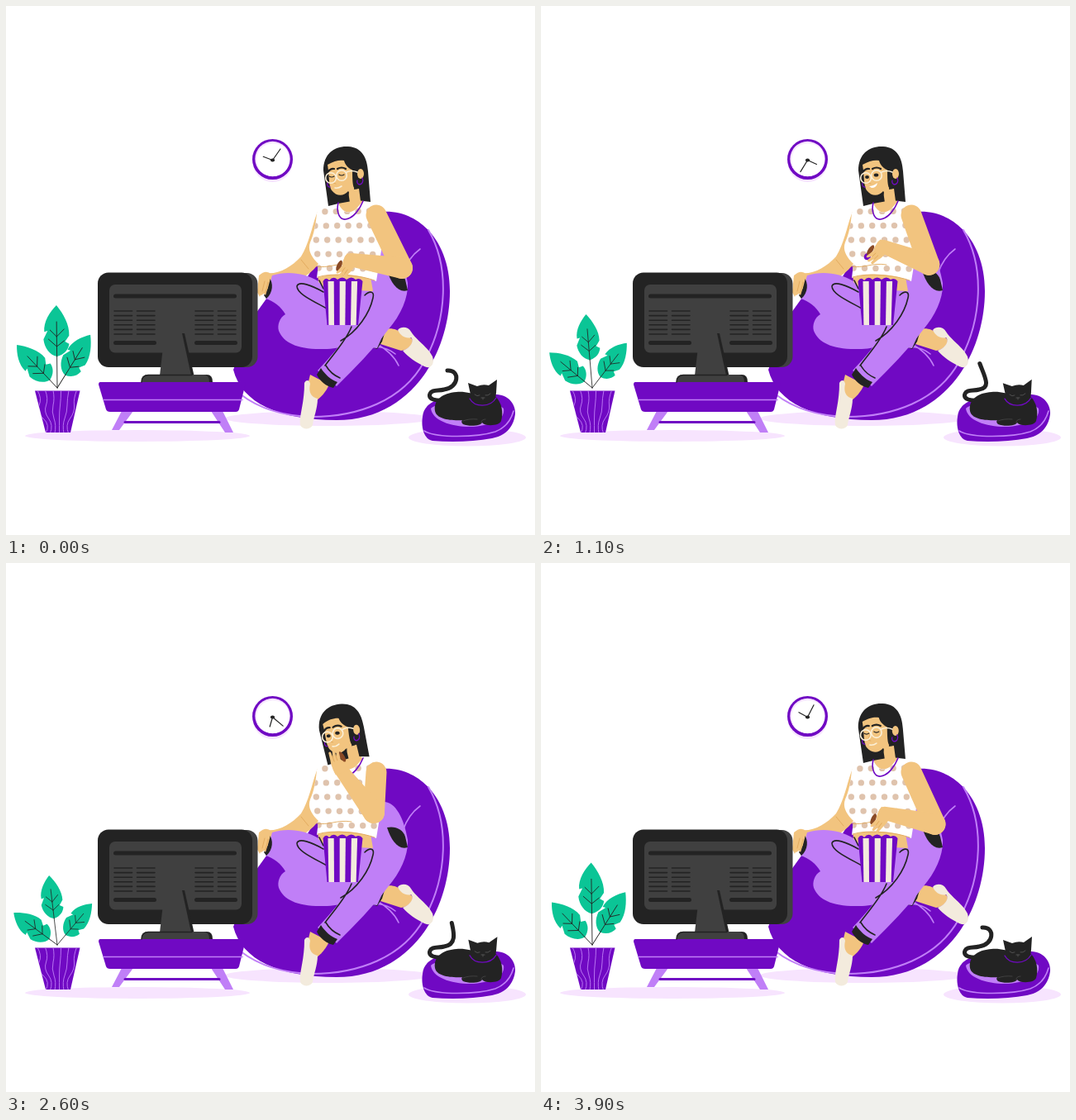
An HTML page that plays this animation: 640x640 px, repeating every 4000 ms.

```html
<!DOCTYPE html>
<html lang="en">
<head>
<meta charset="utf-8">
<title>Movie night</title>
<style>
html, body { margin: 0; width: 100%; height: 100%; overflow: hidden; background: #fff; }
svg { display: block; width: 100vw; height: 100vh; }
.p { fill: #7009c3; } .l { fill: #c07ff7; } .k { fill: #232323; } .g { fill: #404040; }
.s { fill: #f2c47f; } .w { fill: #fff; } .c { fill: #f3ebdd; } .sh { fill: #f7e4fe; }
.ln { fill: none; stroke-linecap: round; stroke-linejoin: round; stroke-width: 1.6; }
.lp { stroke: #c07ff7; } .lk { stroke: #232323; } .lv { stroke: #7009c3; }
.lc { stroke: #fbf0d8; } .lb { stroke: #e0a95c; } .thin { stroke-width: .9; }
</style>
</head>
<body>
<svg viewBox="0 0 640 640">
  <defs>
    <path id="leaf" d="M0-62C-8-54-16-42-15-30L-11-31L-16-21C-15-11-9-2 0 0C9-2 14-8 15-15L10-18L15-25C16-38 8-52 0-62Z"/>
    <path id="veins" d="M0-42V0M0-24l-8-8M0-24l9-9M0-12l-10-9M0-12l9-7"/>
    <clipPath id="shirtClip"><use href="#shirt"/></clipPath>
    <clipPath id="potClip"><use href="#pot"/></clipPath>
    <clipPath id="boxClip"><use href="#box"/></clipPath>
  </defs>

  <g class="sh">
    <ellipse cx="159" cy="520" rx="136" ry="7"/>
    <ellipse cx="390" cy="499" rx="125" ry="9"/>
    <ellipse cx="558" cy="522" rx="71" ry="10.500"/>
  </g>

  <!-- clock -->
  <circle class="sh" cx="322.500" cy="189" r="24"/>
  <circle class="p" cx="322.500" cy="185.500" r="24.500"/>
  <circle class="sh" cx="322.500" cy="185" r="21.200"/>
  <circle class="w" cx="323" cy="186" r="20"/>
  <g class="ln lk" style="stroke-width:1.200">
    <path id="minute" d="M322.500 186.500V170"/>
    <path id="hour" d="M322.500 186.500V174.500"/>
  </g>
  <ellipse class="k" cx="322.500" cy="186.500" rx="2.600" ry="2"/>

  <!-- bean bag -->
  <path class="p" d="M455 249C500 246 537 285 537 345C537 420 490 501 400 501C330 501 285 480 275 440L300 375L318 350L360 335L372 316L450 290Z"/>
  <g class="ln lp">
    <path style="stroke-width:2" d="M511 271C537 315 534 380 506 430C480 478 425 497 370 497C335 496 305 486 284 470"/>
    <path d="M501 294C490 302 484 312 480 324M447 408C460 415 470 424 475 435M448 412C456 413 465 416 471 421"/>
  </g>

  <!-- far foot -->
  <path class="s" d="M458 391C466 389 474 391 478 396C485 400 491 400 492 405C491 412 485 416 478 417L453 409Z"/>
  <path class="c" d="M474 392C478 387 487 388 490 394C497 405 510 412 516 424C519 433 514 440 506 436C496 431 487 425 480 417C490 413 494 405 490 401C484 403 477 399 474 392Z"/>
  <path class="k" d="M452 398L460 389L455 406L449 415L443 413Z"/>

  <!-- far arm -->
  <path class="s" d="M377 249C371 262 368 285 357 303C345 316 330 325 314 323C308 330 305 338 304 347L309 350L316 345L322 338C340 337 360 331 372 319L379 311L386 260Z"/>

  <!-- legs -->
  <g class="l">
    <path d="M378 333C362 323 340 320 322 326L314 354C324 357 333 364 338 373C331 377 328 386 330 393C336 408 354 416 385 415C405 415 425 408 435 398L450 350L440 330Z"/>
    <path d="M425 395L462 385L449 414L430 412Z"/>
    <path d="M440 332L452 290C468 284 481 305 486 335C487 352 478 374 462 392C445 415 420 440 400 460L377 441C392 425 405 410 415 395L432 360Z"/>
  </g>
  <path class="k" d="M461 320C471 318 480 322 483 331L486 344C475 348 466 336 461 320Z"/>
  <path class="k" d="M318 328C324 335 323 347 315 354L312 350L317 341Z"/>
  <path class="s" d="M306 326Q315 318 321 325L318 337L314 350L310 345L307 352L304 346Z"/>
  <path class="ln lb thin" d="M310 345L313 333M314 347L317 334"/>
  <path class="ln lk" d="M388 366C370 356 352 348 352 339C354 332 370 338 384 346M434 350C440 344 446 345 444 353C440 372 425 394 405 405M418 388C412 404 397 420 386 435"/>
  <path class="s" d="M368 446L391 458C387 467 381 474 372 480L362 470Z"/>
  <path class="k" d="M381 438C386 446 393 452 401 455L396 462C387 460 380 454 376 446Z"/>
  <path class="ln lk" d="M387 435C391 442 397 447 404 450"/>
  <path class="c" d="M361 456C363 452 367 452 368 457C366 466 368 473 377 475C377 487 372 498 371 507C368 513 359 513 356 507C354 497 361 482 361 456Z"/>

  <!-- torso -->
  <path class="s" d="M377 322H440L444 345L388 342L378 334Z"/>
  <path class="lk ln" d="M379 332L384 342"/>
  <path class="s" d="M411 218L428 210L430 235L434 240C425 253 408 255 402 238L412 231Z"/>
  <path id="shirt" class="w" d="M376 250C385 241 395 240 402 238C404 250 416 253 424 245L432 236L445 241L458 260L455 290L448 333C430 325 395 321 376 329L378 312C368 302 365 294 368 286C373 275 375 262 376 250Z"/>
  <g id="dots" clip-path="url(#shirtClip)" fill="#dfc3ad"></g>
  <path class="ln lb thin" d="M376 315C390 318 400 310 418 313M357 307L366 318M377 328C395 322 430 326 446 332"/>

  <!-- head -->
  <g id="head">
    <path class="k" d="M384 199C384 178 398 169 414 170C431 171 437 184 438 200L441 237L424 235L413 237L402 239L390 242Z"/>
    <path class="s" d="M390 199L389 192C397 187 404 186 409 187C410 192 415 197 420 199L423 205L421 222L427 221L429 236L416 238L414 224C409 230 400 231 394 223C391 219 391 210 390 199Z"/>
    <path class="k" d="M403 231C408 231 412 228 415 224C415 231 411 235 405 235ZM419 198L425 200L425 221C420 223 419 217 419 198Z"/>
    <ellipse class="s" cx="429" cy="203" rx="4" ry="6"/>
    <path class="ln lv" style="stroke-width:1.300" d="M431 208C433 212 431 216 427 216Q424 214 425 211M389 214Q388 219 392 219"/>
    <path class="ln lk" style="stroke-width:2.200" d="M390 200Q393 196 397 197M401 197Q406 194 411 197"/>
    <path class="ln lb thin" d="M399 205L396 214L399 215"/>
    <g id="open" class="k"><ellipse cx="394.500" cy="207" rx="2.500" ry="2"/><ellipse cx="405.500" cy="204.500" rx="2.800" ry="2"/></g>
    <path id="shut" class="ln lk" style="stroke-width:1.200" d="M391 206Q394 208 397 206M403 204Q406 206 409 204"/>
    <g class="ln lc"><circle cx="393" cy="208" r="6.300"/><circle cx="406" cy="205" r="6.300"/><path d="M412 201Q418 198 425 201"/></g>
    <path id="smile" class="w" d="M397 218Q402 218 407 214Q406 220 400 220Z"/>
    <path id="lips" class="ln lc" d="M398 220Q402 221 406 218"/>
  </g>
  <path class="ln lv" d="M402 238C399 250 404 259 411 258C420 257 428 246 432 236"/>

  <!-- near arm -->
  <path id="upper" class="s"/>
  <path id="fore" class="s"/>
  <g id="hand">
    <ellipse id="snack" class="p" cx="22" cy="4" rx="4.500" ry="4"/>
    <ellipse cx="14" cy="7" rx="7" ry="2.800" fill="#8a4a26" transform="rotate(-12 14 7)"/>
    <path class="s" d="M-4-8C4-9 11-9 15-8L24-7Q26-4 22-4L17-4L25-2Q27 1 23 1L17 0L23 3Q24 6 20 5L12 4C8 7 2 8-4 8Z"/>
    <path class="ln lb thin" d="M12-4H19M12 0H18"/>
  </g>

  <!-- popcorn box -->
  <path id="box" class="p" d="M383.500 333Q387 327 391 332Q396 326 401 331Q407 326 412 331Q418 326 423 331Q428 328 431.500 333L426 386H388.500Z"/>
  <g id="stripes" class="c" clip-path="url(#boxClip)"></g>

  <!-- television -->
  <path class="l" d="M140 490H154L137 513H128ZM248 490H262L275 516H265Z"/>
  <path class="ln lv" style="stroke-width:3" d="M144 503.500H258"/>
  <path class="p" d="M114 455H288Q290 455 289.500 458L282 488Q281 491 278 491H126Q122 491 121 488L112 458Q112 455 114 455Z"/>
  <path class="ln lp" d="M118 476.500H286"/>
  <rect class="g" x="140" y="323" width="164.500" height="114" rx="13"/>
  <rect class="k" x="111" y="322.500" width="187" height="114.500" rx="13"/>
  <rect class="g" x="125" y="337" width="160" height="82.500" rx="7"/>
  <g class="k">
    <rect x="130" y="348.500" width="149" height="5" rx="2.500"/>
    <rect x="130" y="405" width="52" height="5" rx="2.500"/>
    <rect x="228" y="405" width="52" height="5" rx="2.500"/>
    <path d="M200 446H243Q250 446 250 455H200Z"/>
    <path d="M206 396H216L227.500 447H215Z"/>
  </g>
  <g id="vents" class="ln lk"></g>
  <path class="g" d="M164 455Q164 446 172 446H239Q246 446 246 455Z"/>
  <path class="g" d="M192 396H213L224 447H186Z"/>
  <path class="ln lk" d="M164 455Q164 447 172 446.500H225"/>

  <!-- plant -->
  <g id="plant"></g>
  <path id="pot" class="p" d="M35 465.500H89.500L78 516H48Z"/>
  <g id="grain" class="ln lp thin" clip-path="url(#potClip)"></g>

  <!-- cat -->
  <path class="p" d="M504 497C505 482 520 473 548 472L592 470C608 470 617 482 616 494C614 510 604 520 588 523C566 527 540 528 516 526C505 524 502 508 504 497Z"/>
  <path class="l" d="M514 487C520 478 590 474 602 487C604 500 590 506 566 509C540 510 516 502 514 487Z"/>
  <path class="ln lp" d="M506 514C520 523 570 522 592 515C605 510 611 501 614 490"/>
  <path id="tail" class="ln lk" style="stroke-width:5"/>
  <path class="k" d="M519 490C517 477 528 468 545 467C555 466 565 469 572 472L592 472C600 480 602 492 599 502C597 508 580 509 576 504C575 508 560 509 553 506C550 503 551 501 554 501C538 502 521 500 519 490Z"/>
  <path class="ln thin" stroke="#454545" d="M575 504Q575 500 580 500M553 502Q560 499 570 500"/>
  <g id="cat">
    <path class="k" d="M559 456L570 460Q577 457 584 459L594 452L593 468C593 486 563 486 562 470Z"/>
    <path class="ln lv" style="stroke-width:1.300" d="M561 475C567 486 586 486 593 474"/>
    <path class="ln thin" stroke="#555" d="M567 470Q570 473 573 471M580 471Q583 472 586 469M575 474H579M577 474V476"/>
  </g>
</svg>
<script>
const $ = id => document.getElementById(id);
const show = (id, on) => $(id).style.display = on ? '' : 'none';
const move = (el, value) => el.setAttribute('transform', value);
const mix = (a, b, k) => a + (b - a) * k;
const ramp = (t, a, b) => Math.min(1, Math.max(0, (t - a) / (b - a)));
const ease = (t, a, b) => { const k = ramp(t, a, b); return k * k * (3 - 2 * k); };
// Rises from a to b, holds, falls from c to d.
const pulse = (t, a, b, c, d) => ease(t, a, b) - ease(t, c, d);
const between = (t, a, b) => t >= a && t < b;
const repeat = (n, make) => Array.from({ length: n }, (_, i) => make(i)).join('');

// Outline of a tapered limb with round ends.
function limb(x1, y1, r1, x2, y2, r2) {
  const dx = x2 - x1, dy = y2 - y1, d = Math.hypot(dx, dy), nx = -dy / d, ny = dx / d;
  return `M${x1 + nx * r1} ${y1 + ny * r1}A${r1} ${r1} 0 0 1 ${x1 - nx * r1} ${y1 - ny * r1}` +
    `L${x2 - nx * r2} ${y2 - ny * r2}A${r2} ${r2} 0 0 1 ${x2 + nx * r2} ${y2 + ny * r2}Z`;
}

$('dots').innerHTML = repeat(5, r => repeat(7, i =>
  `<circle cx="${372.5 + 13.4 * i + 1.4 * r}" cy="${249 + 17 * r + .1 * i * (r - 2)}" r="3.700"/>`));
$('vents').innerHTML = repeat(4, c => repeat(6, i =>
  `<path d="M${131 + 27.5 * (c % 2) + 98 * (c >> 1)} ${369 + 5.6 * i}h21.500"/>`));
$('stripes').innerHTML = repeat(3, i =>
  `<path d="M${389.5 + 14.2 * i} 333h7.200L${397 + 13.3 * i} 387h-6.600Z"/>`);
$('grain').innerHTML = repeat(6, i =>
  `<path d="M${38 + 9.5 * i} 465q${6 - 2 * i} 10 ${2 - i} 18t${5 - 2 * i} 16t${3 - i} 18"/>`);

const leaves = [
  { angle: -.6, turn: -8.3, shrink: .21, stem: 38, size: 1 },
  { angle: -43.3, turn: -14, shrink: .11, stem: 13, size: .94 },
  { angle: 32, turn: 11, shrink: .185, stem: 18, size: .93 },
];
$('plant').innerHTML = leaves.map(({ stem, size }) =>
  `<g><g transform="translate(0 ${-stem}) scale(${size})"><use href="#leaf" fill="#0bc596"/>` +
  `<use href="#veins" class="ln lk thin"/></g><path class="ln lk thin" d="M0 0V${-stem}"/></g>`).join('');

function draw(t) {
  // The clock runs one turn and back, the plant sways with it.
  const sway = ramp(t, 40, 2120) - ramp(t, 2120, 3940);
  move($('minute'), `rotate(${35 - 360 * sway} 322.5 186.5)`);
  move($('hour'), `rotate(${360 * sway - 69} 322.5 186.5)`);
  leaves.forEach(({ angle, turn, shrink }, i) => move($('plant').children[i],
    `translate(62 462) rotate(${angle + turn * sway}) scale(${1 - shrink * sway})`));

  // From the popcorn to the mouth; the hand turns late.
  const reach = pulse(t, 800, 1650, 3400, 4000);
  const ex = mix(479, 445, reach), ey = mix(317, 302, reach);
  const wx = mix(417, 405, reach), wy = mix(307, 250, reach);
  $('upper').setAttribute('d', limb(448, 253, 12.5, ex, ey, 13));
  $('fore').setAttribute('d', limb(ex, ey, 13, wx, wy, 8));
  move($('hand'), `translate(${wx} ${wy}) rotate(${mix(126, 250, reach * reach)})`);
  show('snack', between(t, 900, 2200));

  const lean = pulse(t, 1400, 1900, 3200, 4000);
  move($('head'), `translate(${-1.5 * lean} ${-lean}) rotate(${-6 * lean} 425 235)`);
  const awake = between(t, 300, 1700) || between(t, 2300, 3800);
  const happy = between(t, 400, 1800);
  show('open', awake);
  show('shut', !awake);
  show('smile', happy);
  show('lips', !happy);

  // The tail uncurls, swings and curls up again.
  const lift = pulse(t, 0, 700, 2200, 3200);
  const swing = lift * (2.5 - 8.5 * Math.cos(2 * Math.PI * (t - 700) / 3000));
  $('tail').setAttribute('d', 'M532 477C520 478 510 476 513 469C515 464 523 466 530 464' +
    `C${548 - 3 * lift} 462 ${550 - 13 * lift} ${440 + 9 * lift} ${534 + swing} ${441 - 8.5 * lift}`);
  move($('cat'), `rotate(${.2 * swing} 577 475)`);
}

// Motion advances ten times a second.
const start = performance.now();
function tick() {
  const t = (performance.now() - start) % 4000;
  draw(Math.floor(t / 100) * 100);
  requestAnimationFrame(tick);
}
tick();
</script>
</body>
</html>
```
